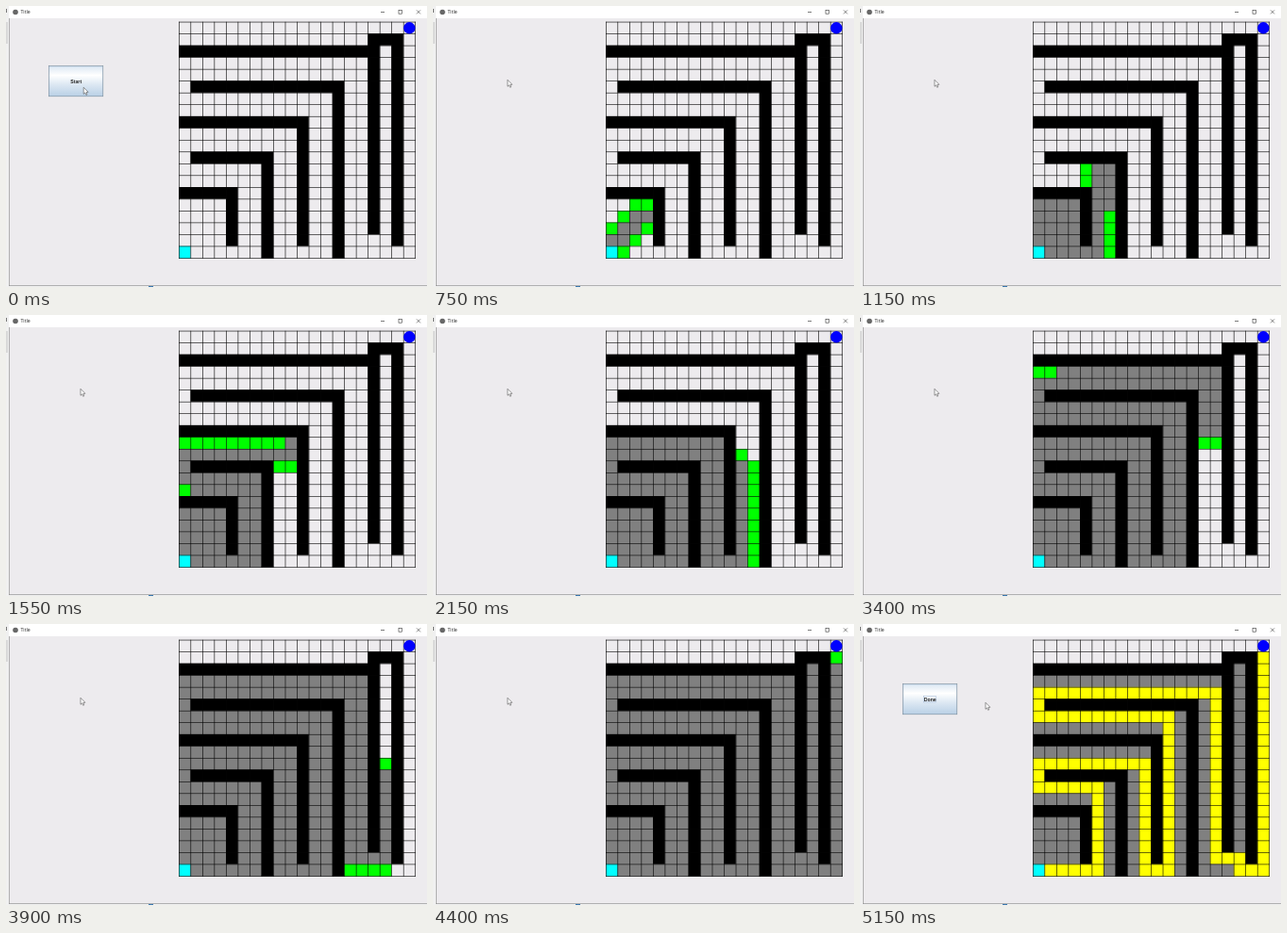
An HTML page with a canvas that plays this animation: 446x298 px, repeating every 5650 ms.

```html
<!DOCTYPE html>
<html>
<head>
<meta charset="utf-8">
<style>
html, body { margin: 0; width: 100%; height: 100%; overflow: hidden; background: #edebee; }
canvas { display: block; }
</style>
</head>
<body>
<canvas id="stage" width="446" height="298"></canvas>
<script>
const ctx = document.getElementById('stage').getContext('2d');
const LOOP = 5650, TICK = 50;
const PRESS_AT = 550, SEARCH_AT = 644, STEP_MS = 15.73, DONE_AT = 4500, PATH_AT = 4650;
const SIZE = 20, PITCH = 12.52, LEFT = 183, TOP = 16.75, LINE = 0.6;
const BG = '#edebee';

const cells = Array.from({ length: SIZE * SIZE }, (_, i) => ({
  c: i % SIZE, r: Math.floor(i / SIZE), opened: Infinity, closed: Infinity
}));
const cellAt = (c, r) =>
  c >= 0 && r >= 0 && c < SIZE && r < SIZE ? cells[r * SIZE + c] : null;
const start = cellAt(0, SIZE - 1), goal = cellAt(SIZE - 1, 0);

function wallRow(r, from, to) {
  for (let c = from; c <= to; c++) cellAt(c, r).wall = true;
}
function wallColumn(c, from, to) {
  for (let r = from; r <= to; r++) cellAt(c, r).wall = true;
}

// Nested corners with alternating gaps, then a hook around the goal
function buildWalls() {
  for (let i = 0; i < 5; i++) {
    const c = 4 + 3 * i, r = 14 - 3 * i, odd = i % 2;
    wallRow(r, odd, c);
    wallColumn(c, r, i < 4 ? 18 + odd : 17);
  }
  wallRow(1, 16, 18);
  wallColumn(18, 1, 18);
}

// Weighted A*: records the step at which each cell is opened and closed
function search() {
  let open = [start];
  start.g = start.f = 0;
  for (let step = 0; open.length; step++) {
    const cur = open.reduce((a, b) => (b.f < a.f ? b : a));
    open = open.filter(cell => cell !== cur);
    cur.closed = step;
    if (cur === goal) break;
    for (const [dc, dr] of [[0, -1], [1, 0], [0, 1], [-1, 0]]) {
      const next = cellAt(cur.c + dc, cur.r + dr);
      if (!next || next.wall || next.closed < Infinity) continue;
      const g = cur.g + 1;
      if (next.g <= g) continue;
      if (next.opened === Infinity) {
        next.opened = step;
        open.push(next);
      }
      next.g = g;
      next.f = g + 2 * Math.hypot(goal.c - next.c, goal.r - next.r);
      next.parent = cur;
    }
  }
  for (let cell = goal.parent; cell !== start; cell = cell.parent) cell.onPath = true;
}

const ramp = (t, from, to) => Math.min(1, Math.max(0, (t - from) / (to - from)));

function rect(color, x, y, w, h) {
  ctx.fillStyle = color;
  ctx.fillRect(x, y, w, h);
}

function outline(color, width, x, y, w, h) {
  ctx.strokeStyle = color;
  ctx.lineWidth = width;
  ctx.strokeRect(x, y, w, h);
}

function disc(color, x, y, radius) {
  ctx.fillStyle = color;
  ctx.beginPath();
  ctx.arc(x, y, radius, 0, 7);
  ctx.fill();
}

function text(label, font, align, x, y) {
  ctx.fillStyle = '#222';
  ctx.font = font;
  ctx.textAlign = align;
  ctx.fillText(label, x, y);
}

function drawWindow() {
  rect(BG, 0, 0, 446, 298);
  rect('#fff', 3, 0, 443, 13);
  rect('#f0f0f0', 0, 0, 3, 298);
  rect('#d8d8d8', 0, 17, 2, 23);
  rect('#777', 0, 3, 1, 4);
  rect('#888', 3, 13, 0.6, 284);
  rect('#888', 3, 296.2, 443, 0.6);
  rect('#f0f0f0', 0, 297, 446, 1);
  rect('#3a78b0', 151, 297, 5, 1);
  disc('#666', 10, 6.5, 2.8);
  text('Title', '5.2px "Open Sans", sans-serif', 'left', 15.5, 8.4);
  rect('#222', 397, 6.2, 4, 0.6);
  outline('#222', 0.55, 416, 4.5, 3.7, 3.7);
  ctx.stroke(new Path2D('M435 4.4l4 4m0-4l-4 4'));
}

function cellColor(cell, step, showPath) {
  if (cell.wall) return '#000';
  if (cell === start) return '#0ff';
  if (showPath && cell.onPath) return '#ff0';
  if (showPath && cell === goal) return BG;
  if (cell.closed <= step) return '#808080';
  return cell.opened <= step ? '#0f0' : BG;
}

function drawGrid(t) {
  const step = Math.floor((t - SEARCH_AT) / STEP_MS);
  for (const cell of cells)
    rect(cellColor(cell, step, t >= PATH_AT),
      LEFT + cell.c * PITCH, TOP + cell.r * PITCH, PITCH + LINE, PITCH + LINE);
  const span = SIZE * PITCH + LINE;
  for (let i = 0; i <= SIZE; i++) {
    rect('#000', LEFT + i * PITCH, TOP, LINE, span);
    rect('#000', LEFT, TOP + i * PITCH, span, LINE);
  }
  disc('#00f', LEFT + (goal.c + 0.5) * PITCH + 0.2, TOP + PITCH / 2 + 0.3, 6.2);
}

function drawButton(label, pressed, focused) {
  const shade = ctx.createLinearGradient(0, 64, 0, 96);
  shade.addColorStop(0, '#dde8f3');
  shade.addColorStop(0.3, '#fff');
  shade.addColorStop(0.6, '#dde8f3');
  shade.addColorStop(1, '#b8cfe5');
  rect(pressed ? '#b8cfe5' : shade, 45, 63.4, 58, 32.6);
  outline('#b8cfe5', 0.5, 45.9, 64.2, 56.3, 31);
  outline('#7a8a99', 0.6, 45.3, 63.6, 57.5, 32.2);
  if (focused) outline('#8fa9cc', 0.4, 67.5, 76.5, 13, 6.5);
  text(label, 'bold 5.2px "Liberation Sans", Arial, sans-serif', 'center', 74.2, 81.6);
}

const arrow = new Path2D('M0 0V7L1.6 5.6L2.7 8L3.8 7.5L2.8 5.2L4.9 5Z');

function drawCursor(t) {
  const toRest = ramp(t, 50, 350), away = ramp(t, PATH_AT, 5150);
  ctx.save();
  ctx.translate(82.2 - 3.2 * toRest + 54 * away, 86.3 - 8 * toRest + 5 * away);
  ctx.fillStyle = '#fff';
  ctx.fill(arrow);
  ctx.strokeStyle = '#333';
  ctx.lineWidth = 0.5;
  ctx.stroke(arrow);
  ctx.restore();
}

function draw(now) {
  const t = Math.floor((now % LOOP) / TICK) * TICK;
  drawWindow();
  drawGrid(t);
  if (t < PRESS_AT + TICK) drawButton('Start', t >= PRESS_AT, false);
  if (t >= DONE_AT) drawButton('Done', false, true);
  drawCursor(t);
  requestAnimationFrame(draw);
}

buildWalls();
search();
requestAnimationFrame(draw);
</script>
</body>
</html>
```
